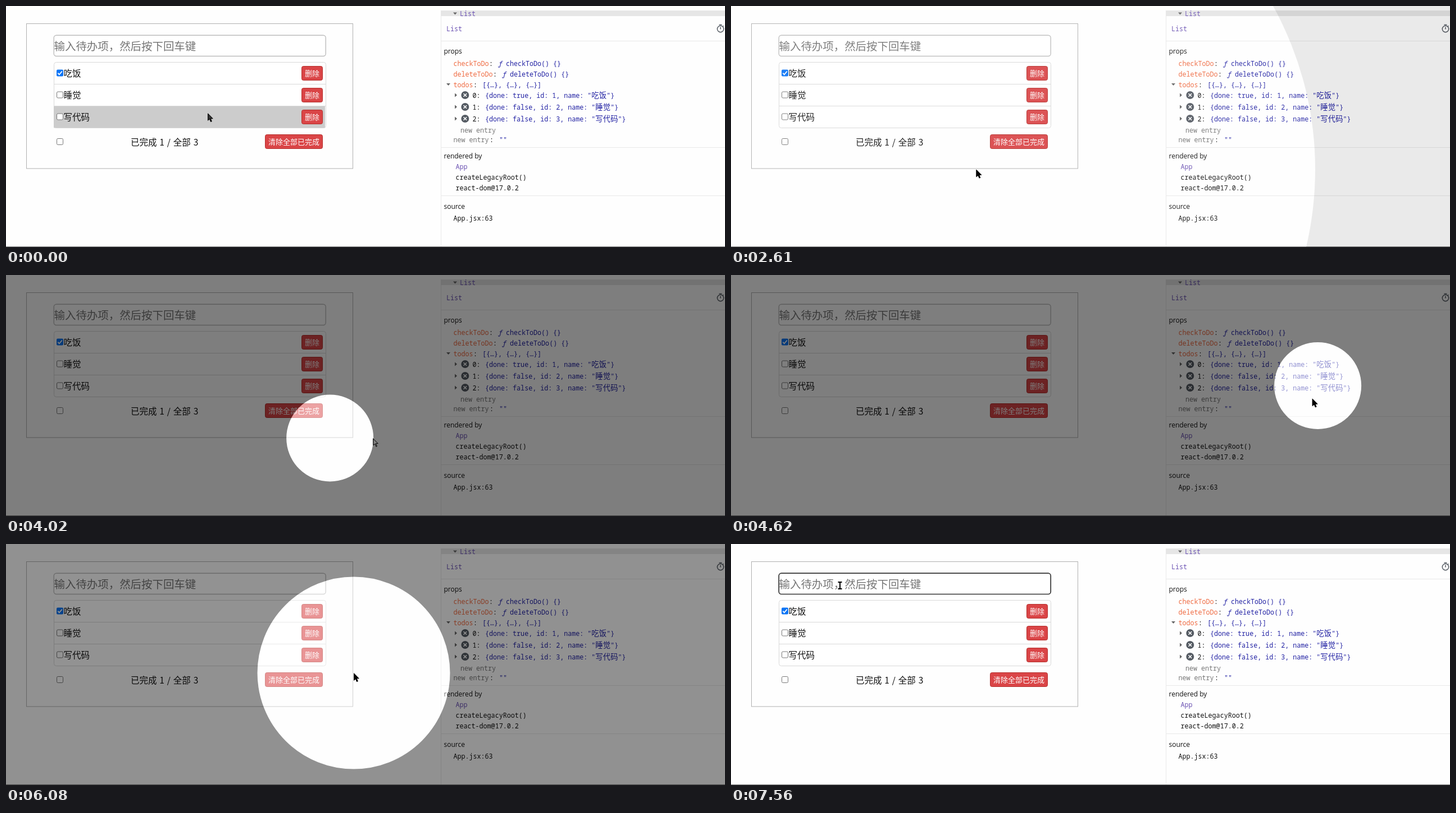
These frames come from a looping animation (1280x430 px, 8 s). An HTML page:

```html
<!DOCTYPE html>
<html lang="zh">
<head>
<meta charset="utf-8">
<title>To-do spotlight</title>
<style>
html, body { margin: 0; width: 100%; height: 100%; overflow: hidden; background: #fefefe; }
svg { display: block; width: 1280px; height: 430px; }
text { font-family: "Noto Sans CJK SC", "Noto Sans CJK", "Noto Sans", sans-serif; fill: #111; }
.mono { font-family: "Noto Sans Mono", "DejaVu Sans Mono", "Noto Sans CJK SC", monospace; font-size: 11.7px; }
.cjk { font-family: "Noto Sans CJK SC", "Noto Sans CJK", sans-serif; font-size: 13.4px; }
.head { font-family: "Open Sans", "Noto Sans", sans-serif; font-size: 12px; }
.item { font-size: 15.5px; }
.btn { font-size: 13px; fill: #fff; }
.key { fill: #ef6a41; }
.val { fill: #2323a4; }
.type { fill: #6a51b2; }
.dim { fill: #777; }
</style>
</head>
<body>
<svg id="stage" viewBox="0 0 1280 430">
  <rect width="1280" height="430" fill="#fefefe"/>
  <g id="page"></g>
  <g id="tools"></g>
  <path d="M0 429.5H1280" stroke="#777"/>
  <circle id="spot" fill="#fff" stroke="#000" stroke-width="3000"/>
  <g id="arrow">
    <path d="M0 0V14L3.2 11.2 5.3 16 7.8 15 5.7 10.2H10Z" fill="#fff" style="mix-blend-mode:difference"/>
    <path d="M.5 1.2V12.8L3.4 10.3 5.6 15.3 7.1 14.6 5 9.7H8.9Z" fill="none" stroke="#000"/>
  </g>
  <path id="beam" d="M-3.5-6H-1L0-5 1-6H3.5M0-5V5M-3.5 6H-1L0 5 1 6H3.5" fill="none" stroke="#000" stroke-width="2"/>
</svg>
<script>
const LOOP = 8000, LAG = 55, FADE = 500;
const SHOW = 2561, HIDE = 6031, RADIUS = 77.5, ZOOM = 9;
const $ = id => document.getElementById(id);

// pointer path: time, x, y
const path = [
  [0, 359, 191], [995, 359, 191], [1370, 436.5, 291.5], [2800, 436.5, 291.5],
  [3250, 293, 212], [3480, 214, 258], [3800, 372, 291], [4020, 652, 291],
  [4120, 800, 262], [4230, 951, 170], [4420, 1043, 130], [4620, 1035, 220],
  [4800, 965, 232], [5000, 890, 150], [5180, 871, 140], [5300, 868, 142],
  [5450, 975, 126], [5560, 1102, 180], [5700, 965, 242], [5850, 655, 236],
  [5960, 619, 230], [6300, 619, 230], [6540, 545, 205], [6650, 470, 172],
  [6760, 350, 125], [6920, 194, 74], [LOOP, 194, 74]
];

function slope(i, k) {
  const a = path[i - 1], b = path[i], c = path[i + 1];
  if (!a || !c || a[k] === b[k] || b[k] === c[k]) return 0;
  return (c[k] - a[k]) / (c[0] - a[0]);
}

function pointer(t) {
  t = Math.max(0, t);
  let i = 0;
  while (i < path.length - 2 && path[i + 1][0] <= t) i++;
  const a = path[i], b = path[i + 1], d = b[0] - a[0];
  const u = (t - a[0]) / d, v = 1 - u;
  return [1, 2].map(k =>
    a[k] * v * v * (1 + 2 * u) + b[k] * u * u * (1 + 2 * v) +
    d * u * v * (slope(i, k) * v - slope(i + 1, k) * u));
}

// cubic-bezier(.41, .52, 0, .94)
function ease(x) {
  if (x <= 0) return 0;
  if (x >= 1) return 1;
  const curve = (s, p, q) => 3 * p * s * (1 - s) ** 2 + 3 * q * s * s * (1 - s) + s ** 3;
  let lo = 0, hi = 1;
  for (let n = 0; n < 24; n++) {
    const mid = (lo + hi) / 2;
    if (curve(mid, .41, 0) < x) lo = mid; else hi = mid;
  }
  return curve(lo, .52, .94);
}

const text = (x, y, cls, s, extra = '') => `<text x="${x}" y="${y}" class="${cls}" ${extra}>${s}</text>`;
const rect = (x, y, w, h, r, fill, stroke, extra = '') =>
  `<rect x="${x}" y="${y}" width="${w}" height="${h}" rx="${r}" fill="${fill}" stroke="${stroke}" ${extra}/>`;
const line = (d, color) => `<path d="${d}" stroke="${color}" fill="none"/>`;
const mono = (x, y, cls, s) => text(x, y + 4.5, 'mono ' + cls, s);
const button = (x, y, w, s) => rect(x + .5, y + .5, w, 25, 3, '#da4547', '#b52f2c') + text(x + 6, y + 18, 'btn', s);
const check = (y, on) => on
  ? rect(90, y, 12, 12, 2, '#0d75f5', 'none') +
    `<path d="M92.3 ${y + 6.2}l2.5 2.6 5-5.8" fill="none" stroke="#fff" stroke-width="1.8"/>`
  : rect(90.5, y + .5, 11, 11, 2, '#fff', '#767676');

const tasks = ['吃饭', '睡觉', '写代码'];
const rowTop = [100, 139, 178];

function drawPage() {
  let s = rect(36.5, 31.5, 581, 258.5, 0, 'none', '#b0b0b0');
  s += rect(85.2, 52.2, 484, 37.3, 4.5, '#fff', '#bdbdbd', 'id="input" stroke-width="1.4"');
  s += text(85.5, 78.5, '', '输入待办项，然后按下回车键', 'style="font-size:19.45px;fill:#757575"');
  s += '<rect id="caret" x="86" y="60" width="1" height="23"/>';
  s += rect(85.5, 100.5, 484, 117, 4, '#fff', '#d9d9d9');
  s += '<rect id="hover" x="85" width="483" height="39.5" rx="1" fill="#ccc"/>';
  s += line('M85 139.5H569M85 178.5H569', '#d9d9d9');
  tasks.forEach((name, i) => {
    const y = rowTop[i];
    s += check(y + 13.5, i === 0) + text(102.5, y + 26, 'item', name) + button(526, y + 7, 37, '删除');
  });
  s += check(236, false) + text(222, 248.5, 'item', '已完成 1 / 全部 3', 'style="word-spacing:1.4px"');
  s += button(461, 229, 102, '清除全部已完成');
  $('page').innerHTML = s;
}

function drawTools() {
  const down = (x, y) => `<path d="M${x} ${y}h7l-3.5 4z" fill="#666"/>`;
  let s = '<rect x="774" y="8" width="506" height="10" fill="#e6e6e6"/>' + down(796, 11.5);
  s += mono(808, 13, 'type', 'List') + mono(784, 40, 'type', 'List');
  s += line('M774.5 18V429M774 62.5H1280M774 252.5H1280M774 338.5H1280', '#e9e9e9');
  s += '<g fill="none" stroke="#555b63" stroke-width="1.5"><circle cx="1272" cy="41" r="5.7"/>' +
       '<path d="M1269.5 33.5h5M1272 37.5v4M1276 36.8l1.5-1.5"/></g>';
  s += text(779.5, 85, 'head', 'props') + text(779.5, 271.5, 'head', 'rendered by') + text(779.5, 361.5, 'head', 'source');
  [['checkToDo', 102], ['deleteToDo', 121]].forEach(([name, y]) => {
    const end = 796.5 + name.length * 7.05;
    s += mono(796.5, y, 'key', name) + mono(end, y, '', ':') +
         `<g font-style="italic">${mono(end + 16, y, 'val', 'ƒ')}</g>` + mono(end + 30, y, 'val', name + '() {}');
  });
  s += down(784, 138) + mono(796.5, 140, 'key', 'todos') + mono(832, 140, '', ':') + mono(848, 140, 'val', '[{…}, {…}, {…}]');
  tasks.forEach((name, i) => {
    const y = [159, 180, 201][i];
    s += `<path d="M799 ${y - 3.5}v7l4-3.5z" fill="#666"/><circle cx="817.3" cy="${y}" r="7" fill="#555b63"/>` +
         `<path d="M814.5 ${y - 2.8}l5.6 5.6m0-5.6l-5.6 5.6" stroke="#fff" stroke-width="1.6"/>`;
    s += mono(830.5, y, '', i + ':') +
         mono(853, y, 'val', `{done: ${i === 0}, id: ${i + 1}, name: "<tspan class="cjk">${name}</tspan>"}`);
  });
  s += mono(809, 221, 'dim', 'new entry') + mono(796.5, 238, 'dim', 'new entry') + mono(861, 238, '', ':') + mono(878, 238, 'val', '""');
  s += mono(800.5, 286, 'type', 'App') + mono(800.5, 305, '', 'createLegacyRoot()') + mono(800.5, 324, '', 'react-dom@17.0.2');
  s += mono(796.5, 378, '', 'App.jsx:63');
  $('tools').innerHTML = s;
}

function set(id, attrs) {
  for (const k in attrs) $(id).setAttribute(k, attrs[k]);
}
const shown = on => on ? 'visible' : 'hidden';

function render(t) {
  const [x, y] = pointer(t), [cx, cy] = pointer(t - LAG);
  const inside = x > 85 && x < 569;
  const row = inside ? rowTop.findIndex(top => y >= top && y < top + 39.5) : -1;
  const typing = inside && y > 52 && y < 90;

  set('hover', { y: rowTop[Math.max(row, 0)], visibility: shown(row >= 0) });
  set('arrow', { transform: `translate(${x} ${y})`, visibility: shown(!typing) });
  set('beam', { transform: `translate(${x} ${y})`, visibility: shown(typing) });
  set('input', { stroke: t >= 7000 ? '#333' : '#bdbdbd', 'stroke-width': t >= 7000 ? 1.7 : 1.4 });
  set('caret', { visibility: shown(t >= 7000 && t < 7530) });

  const focus = t < 2605 ? 0 : ease((t - SHOW) / FADE) - ease((t - HIDE) / FADE);
  const r = RADIUS * (ZOOM - (ZOOM - 1) * focus);
  set('spot', { cx, cy, r: r + 1500, opacity: focus / 2 });
}

drawPage();
drawTools();
const start = performance.now();
function tick() {
  render((performance.now() - start) % LOOP);
  requestAnimationFrame(tick);
}
tick();
</script>
</body>
</html>
```
